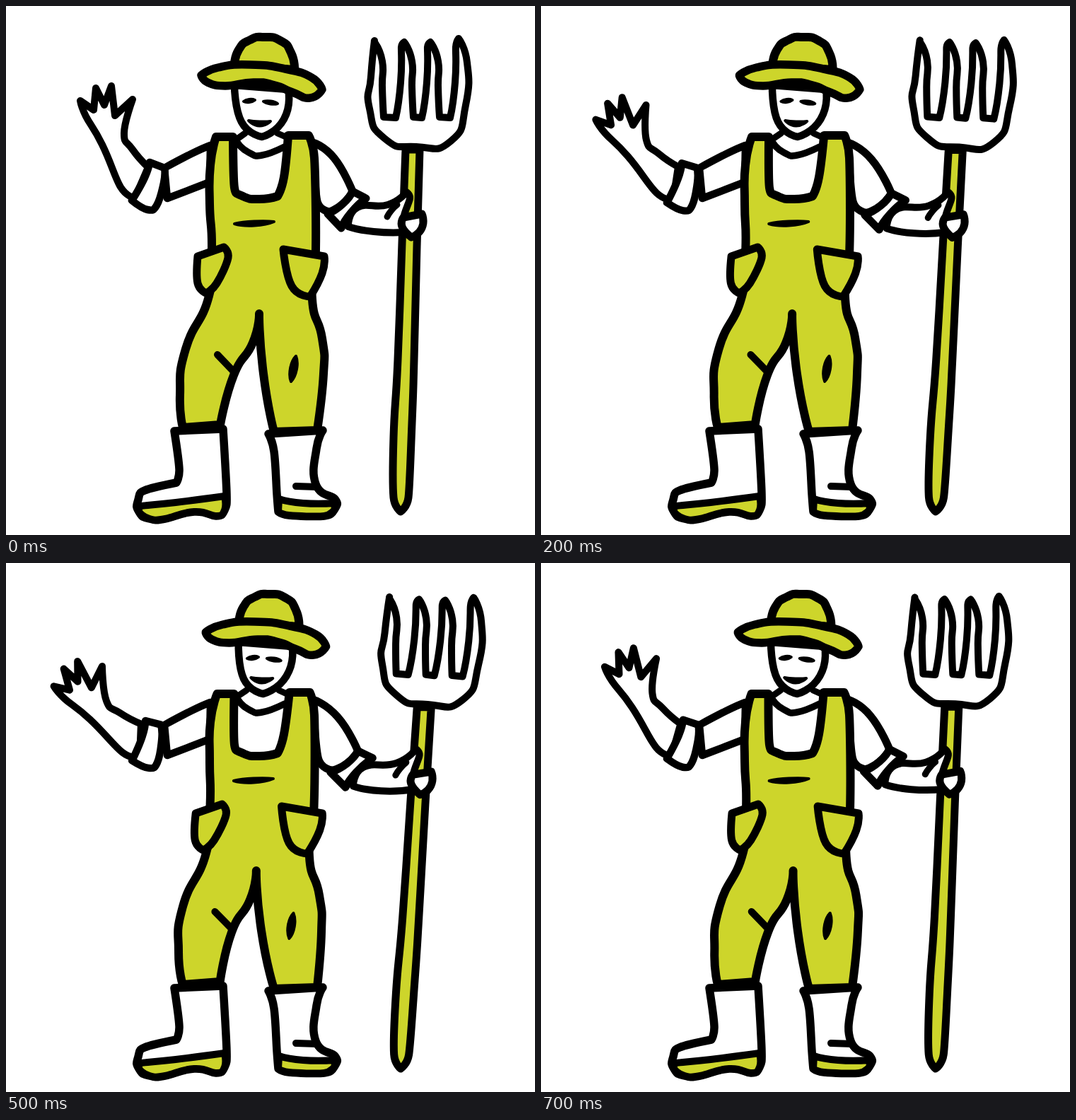
Animation of 748x748 px, one loop 800 ms. Source, as an HTML page:

```html
<!DOCTYPE html>
<html lang="en">
<head>
<meta charset="utf-8">
<title>Waving farmer</title>
<style>
  html, body { margin: 0; width: 100%; height: 100%; overflow: hidden; background: #fff; }
  svg { display: block; width: 100%; height: 100%; }
  path { stroke: #000; stroke-linejoin: round; stroke-linecap: round; }
</style>
</head>
<body>
<svg id="stage" viewBox="0 0 748 748"></svg>
<script>
const GREEN = '#cdd52b', WHITE = '#fff', BLACK = '#000', NONE = 'none';
const STEP = 100, STEPS = 8;
const stage = document.getElementById('stage');
const clamp = v => Math.min(1, Math.max(0, v));

// Out and back over one loop, slowing a little at the far end.
function sway(step) {
  const u = 1 - Math.abs(2 * step / STEPS - 1);
  return 1.22 * (.75 * u + .25 * Math.sin(u * Math.PI / 2));
}

// Motion rules: each takes a point and the amount of sway.
const still = p => p;

const turn = (cx, cy, deg) => ([x, y], k) => {
  const a = deg * k * Math.PI / 180, c = Math.cos(a), s = Math.sin(a);
  return [cx + (x - cx) * c - (y - cy) * s, cy + (x - cx) * s + (y - cy) * c];
};
const wave = turn(195, 255, -21.7);
const cuffTurn = turn(218, 275, -6.5);
const tilt = turn(560, 715, 1.88);

// The head leans right while the hips go left.
const lean = ([x, y], k) => {
  const head = 7 * (1 - clamp((y - 36) / 165) ** 2.5);
  const hips = 4.3 * Math.sin(Math.PI * clamp((y - 280) / 320));
  return [x + k * (head - hips), y];
};

// The holding arm stretches from shoulder to hand.
const reach = ([x, y], k) => {
  const u = clamp((x - 434) / 128);
  return [x + k * 14 * u ** .7, y + k * 4 * Math.sin(Math.PI * u)];
};

// Curve through the points; sharp turns stay corners.
function curve(pts, closed) {
  const n = pts.length;
  const at = i => closed ? pts[(i + n) % n] : pts[i];
  const tangent = i => {
    const a = at(i - 1), b = at(i), c = at(i + 1);
    if (!a || !c) return [0, 0];
    const ux = b[0] - a[0], uy = b[1] - a[1], vx = c[0] - b[0], vy = c[1] - b[1];
    const lu = Math.hypot(ux, uy), lv = Math.hypot(vx, vy);
    if (ux * vx + uy * vy < .5 * lu * lv) return [0, 0];
    const m = Math.min(lu, lv) / (lu + lv) / 1.6;
    return [(ux + vx) * m, (uy + vy) * m];
  };
  const f = v => v.toFixed(2);
  let d = `M${f(pts[0][0])},${f(pts[0][1])}`;
  for (let i = 0; i < (closed ? n : n - 1); i++) {
    const p = at(i), q = at(i + 1), s = tangent(i), e = tangent(closed ? (i + 1) % n : i + 1);
    d += `C${f(p[0] + s[0])},${f(p[1] + s[1])} ${f(q[0] - e[0])},${f(q[1] - e[1])} ${f(q[0])},${f(q[1])}`;
  }
  return closed ? d + 'Z' : d;
}

const parts = [];
function add(text, fill, width, move) {
  const el = document.createElementNS('http://www.w3.org/2000/svg', 'path');
  el.setAttribute('fill', fill);
  el.setAttribute('stroke-width', width);
  stage.append(el);
  const pts = text.trim().split(/\s+/).map(p => p.split(',').map(Number));
  parts.push({ el, pts, move, closed: fill !== NONE });
}

// Brush mark: pointed ends, thick middle, bent downwards by sag.
function mark(x0, y0, x1, y1, thick, sag = 0) {
  const len = Math.hypot(x1 - x0, y1 - y0);
  const nx = (y0 - y1) / len * thick / 2, ny = (x1 - x0) / len * thick / 2;
  const mx = (x0 + x1) / 2, my = (y0 + y1) / 2 + sag;
  add(`${x0},${y0} ${mx - nx},${my - ny} ${x1},${y1} ${mx + nx},${my + ny}`, BLACK, 4, lean);
}

// Fork head: a bowl with a gap between each pair of tines.
function forkHead(tips) {
  let d = `${tips[0]},49 516,100 514,145 535,187 580,199 629,191 650,140 652,80 ${tips[3]},46`;
  for (let i = 3; i > 0; i--) {
    const a = tips[i - 1], b = tips[i];
    d += ` ${b - 4},58 ${b - 5},108 ${b - 12},158 ${a + 13},157 ${a + 11},115 ${a + 11},78 ${a},51`;
  }
  return d;
}

function boot(leg, sole, seam) {
  add(leg + ' ' + sole, WHITE, 11.5, still);
  add(sole + ' ' + seam, GREEN, 10, still);
}

// Pitchfork
add('565,203 560,335 554,500 548,610 548,695 558,715 569,695 574,590 577,500 581,340 585,203', GREEN, 11, tilt);
add(forkHead([521, 563, 600, 640]), WHITE, 10, tilt);

// Holding arm
add('497,285 540,281 566,263 571,272 562,300 562,320 520,319 484,312', WHITE, 10, reach);
add('539,298 545,289 553,281', NONE, 9, reach);
add('562,299 588,294 588,314 573,327 560,312', WHITE, 11, tilt);
add('434,193 464,215 490,262 476,280 457,291 440,276', WHITE, 11, reach);
add('490,262 509,272 488,292 474,314 455,294 476,280', WHITE, 11, reach);

// Waving arm
add(`201,228 179,203 167,180 179,132 154,155 149,113 139,140 127,116 124,147 105,134
  113,156 136,196 162,256 182,272`, WHITE, 10, wave);
add('289,197 262,209 224,229 228,272 288,249', WHITE, 10.5, still);
add('203,221 224,229 223,250 213,282 200,288 178,275 196,243', WHITE, 10.5, cuffTurn);

// Neck
add('324,190 338,180', NONE, 9, lean);
add('384,180 400,187', NONE, 9, lean);
add('328,194 343,207 362,211 394,199', NONE, 9.5, lean);

// Overalls
add(`297,185 321,185 323,257 335,269 358,273 384,269 393,242 399,183 428,183 436,215 438,345 433,415 447,470
  449,520 440,600 379,602 364,520 358,435 349,476 322,522 303,592 250,596 246,550 254,485 287,410 291,343
  288,280 289,225`, GREEN, 12, lean);
add('271,354 308,341 314,356 298,392 283,406 271,392', GREEN, 11, lean);
add('392,344 450,354 447,378 430,411 404,396', GREEN, 11, lean);
mark(323, 308, 379, 305, 6, 1);
add('299,493 322,517', NONE, 10, lean);
mark(410, 495, 403, 531, 9);

// Boots
boot('187,698 196,685 241,674 245,655 238,601 307,598 312,690', '309,713 297,721 266,715 225,725 203,725 188,715',
  '192,707 240,702 309,693');
boot('383,690 379,630 371,605 448,600 439,626 438,676 465,697', '465,711 450,721 400,720 385,715', '386,697 420,703 464,703');
add('410,679 440,680', NONE, 10, still);

// Head
add('323,112 333,164 362,185 393,160 399,118', WHITE, 10.5, lean);
mark(336, 135, 352, 133, 4);
mark(364, 135, 384, 138, 4);
mark(343, 162, 374, 163, 6, 4);

// Hat
add('323,84 329,62 345,48 365,44 388,49 403,66 408,90', GREEN, 12, lean);
add('276,98 300,87 345,83 395,89 432,101 447,118 430,130 405,122 380,112 350,108 310,113 285,108', GREEN, 11.5, lean);

let shown = -1;
function draw(step) {
  if (step === shown) return;
  shown = step;
  const k = sway(step);
  for (const { el, pts, move, closed } of parts) {
    el.setAttribute('d', curve(pts.map(p => move(p, k)), closed));
  }
}

const start = performance.now();
function tick() {
  draw(Math.floor((performance.now() - start) / STEP) % STEPS);
  requestAnimationFrame(tick);
}
tick();
</script>
</body>
</html>
```
